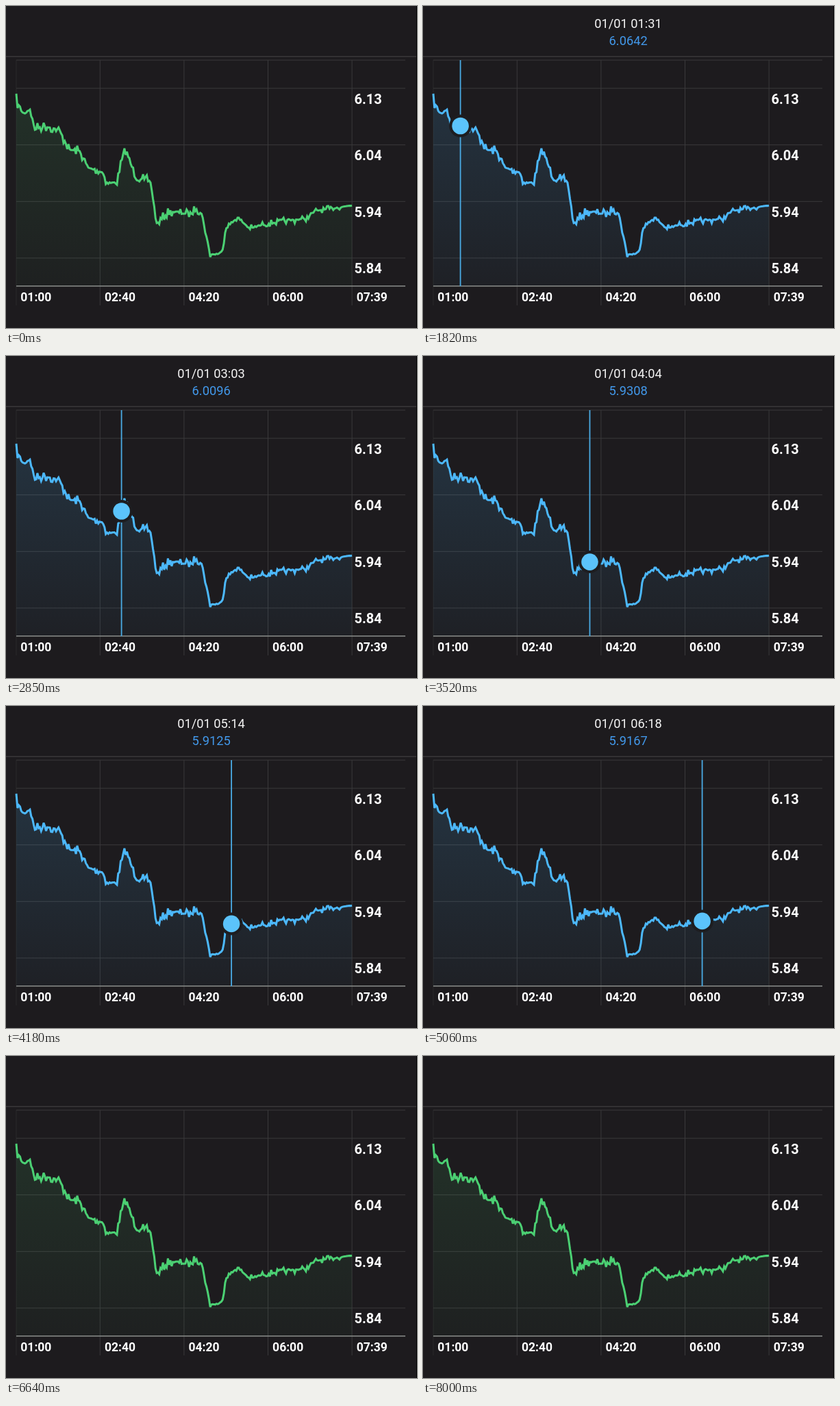
Write an HTML page that moves like this. It is 600 px wide and 470 px high and loops after 8.09 s.

```html
<!DOCTYPE html>
<html lang="en">
<head>
<meta charset="utf-8">
<title>Price chart</title>
<style>
  html, body { margin: 0; width: 100%; height: 100%; overflow: hidden; background: #1d1b1e; }
  svg { display: block; width: 100%; height: 100%; font-family: Roboto, sans-serif; }
  .grid { stroke: #3a393b; fill: none; }
  .labels { fill: #fff; font-weight: 700; }
  .times { font-size: 17.5px; }
  .prices { font-size: 20px; }
  .readout { font-size: 18.3px; text-anchor: middle; }
  .curve { fill: none; stroke-width: 3; stroke-miterlimit: 3; }
</style>
</head>
<body>
<svg viewBox="0 0 600 470">
  <defs>
    <linearGradient id="greenFill" x1="0" y1="138" x2="0" y2="409" gradientUnits="userSpaceOnUse">
      <stop stop-color="#4bd073" stop-opacity=".12"/>
      <stop offset="1" stop-color="#4bd073" stop-opacity=".03"/>
    </linearGradient>
    <linearGradient id="blueFill" x1="0" y1="138" x2="0" y2="409" gradientUnits="userSpaceOnUse">
      <stop stop-color="#4cb8fb" stop-opacity=".15"/>
      <stop offset="1" stop-color="#4cb8fb" stop-opacity=".035"/>
    </linearGradient>
  </defs>
  <rect width="600" height="470" fill="#1d1b1e"/>
  <path d="M599.5 0V470" stroke="#000"/>
  <path d="M0 73.8H599" stroke="#464547"/>
  <path d="M15 79V437" class="grid" opacity=".5"/>
  <path id="grid" class="grid"/>
  <g id="green">
    <path class="area" fill="url(#greenFill)"/>
    <path class="curve" stroke="#4bd073"/>
  </g>
  <g id="blue">
    <path class="area" fill="url(#blueFill)"/>
    <path class="curve" stroke="#4cb8fb"/>
  </g>
  <path d="M15 408.7H583" stroke="#8a8d8a" stroke-width="1.4"/>
  <g id="labels" class="labels"></g>
  <g id="cursor">
    <g id="marker">
      <path d="M0 79V409" stroke="#4aabe4" stroke-width="1.8"/>
      <g id="dot">
        <circle r="16.5" fill="#1d1d20"/>
        <circle r="12.3" fill="#5bc3fb"/>
      </g>
    </g>
    <text id="clock" class="readout" x="299.5" y="31.7" fill="#f4f4f4"></text>
    <text id="price" class="readout" x="299.7" y="56.8" fill="#4298ea"></text>
  </g>
</svg>
<script>
const LOOP = 8090, LEFT = 15, RIGHT = 505, BASE = 409;
const COLUMN = 122.6, ROW = 82.6, SAMPLES = 270;
const $ = id => document.getElementById(id);

// Main turns of the price curve: [x, y]
const trend = [
  [15, 139], [25, 157], [35, 151], [42, 180], [54.5, 175], [78, 181], [92, 210], [107, 211],
  [120, 236], [141, 243], [148, 259], [162, 257], [168.5, 226.8], [174.5, 208], [181, 228],
  [190, 250], [211, 257], [220, 318], [239, 300], [270, 304], [278, 294], [286, 304],
  [298, 363], [314, 361], [322, 320], [329, 318], [337, 308], [356, 325], [375, 319],
  [407.5, 313.9], [438, 310], [452, 299], [481.5, 294.5], [505, 291]
];

// Drag of the cursor: [ms, x]
const drag = [
  [1580, 46], [1820, 54.5], [2850, 168.5], [4000, 297], [4180, 329],
  [4820, 393], [5060, 407.5], [5880, 481.5], [6250, 497]
];

const clamp = v => Math.min(1, Math.max(0, v));
const mix = (a, b, k) => a + (b - a) * k;

function along(points, at) {
  const next = points.findIndex(p => p[0] >= at);
  const i = next < 0 ? points.length - 1 : Math.max(1, next);
  const [a0, b0] = points[i - 1], [a1, b1] = points[i];
  return mix(b0, b1, clamp((at - a0) / (a1 - a0)));
}

// Mostly small steps with a few sharp spikes, calmer towards the right
function buildCurve() {
  let seed = 7;
  const random = () => (seed = seed * 16807 % 2147483647) / 2147483647;
  const points = Array.from({ length: SAMPLES + 1 }, (_, i) => {
    const k = i / SAMPLES, x = mix(LEFT, RIGHT, k);
    const noise = (random() * 2 - 1) ** 3 * mix(11, 4, k);
    return `${x.toFixed(2)} ${(along(trend, x) + noise).toFixed(2)}`;
  });
  return 'M' + points.join('L');
}

function label(text, x, y, kind) {
  const el = document.createElementNS('http://www.w3.org/2000/svg', 'text');
  el.setAttribute('x', x);
  el.setAttribute('y', y);
  el.setAttribute('class', kind);
  el.textContent = text;
  $('labels').append(el);
}

let grid = 'M15 79H583';
['6.13', '6.04', '5.94', '5.84'].forEach((text, i) => {
  const y = 120.1 + i * ROW;
  grid += `M15 ${y}H583`;
  label(text, 508.5, y + 22.4, 'prices');
});
['01:00', '02:40', '04:20', '06:00', '07:39'].forEach((text, i) => {
  const x = 14.7 + i * COLUMN;
  if (i) grid += `M${x} 79V437`;
  label(text, x + 6.6, 430.8, 'times');
});
$('grid').setAttribute('d', grid);

const curve = buildCurve();
document.querySelectorAll('.curve').forEach(el => el.setAttribute('d', curve));
document.querySelectorAll('.area').forEach(el => el.setAttribute('d', `${curve}V${BASE}H${LEFT}Z`));

const pad = n => String(n).padStart(2, '0');

function draw(t) {
  const active = clamp((t - 1570) / 110) * clamp((6520 - t) / 120);
  $('green').setAttribute('opacity', 1 - active);
  $('blue').setAttribute('opacity', active);
  $('cursor').setAttribute('opacity', active);
  const x = along(drag, t), y = along(trend, x);
  const minutes = Math.floor(31.15 + (x - 54.5) / 1.2305);
  $('marker').setAttribute('transform', `translate(${x} 0)`);
  $('dot').setAttribute('transform', `translate(0 ${y})`);
  $('clock').textContent = `01/01 ${pad(1 + Math.floor(minutes / 60))}:${pad(minutes % 60)}`;
  $('price').textContent = (6.0642 - (y - 175) * 0.001062).toFixed(4);
}

const start = performance.now();
function tick() {
  draw((performance.now() - start) % LOOP);
  requestAnimationFrame(tick);
}
tick();
</script>
</body>
</html>
```
